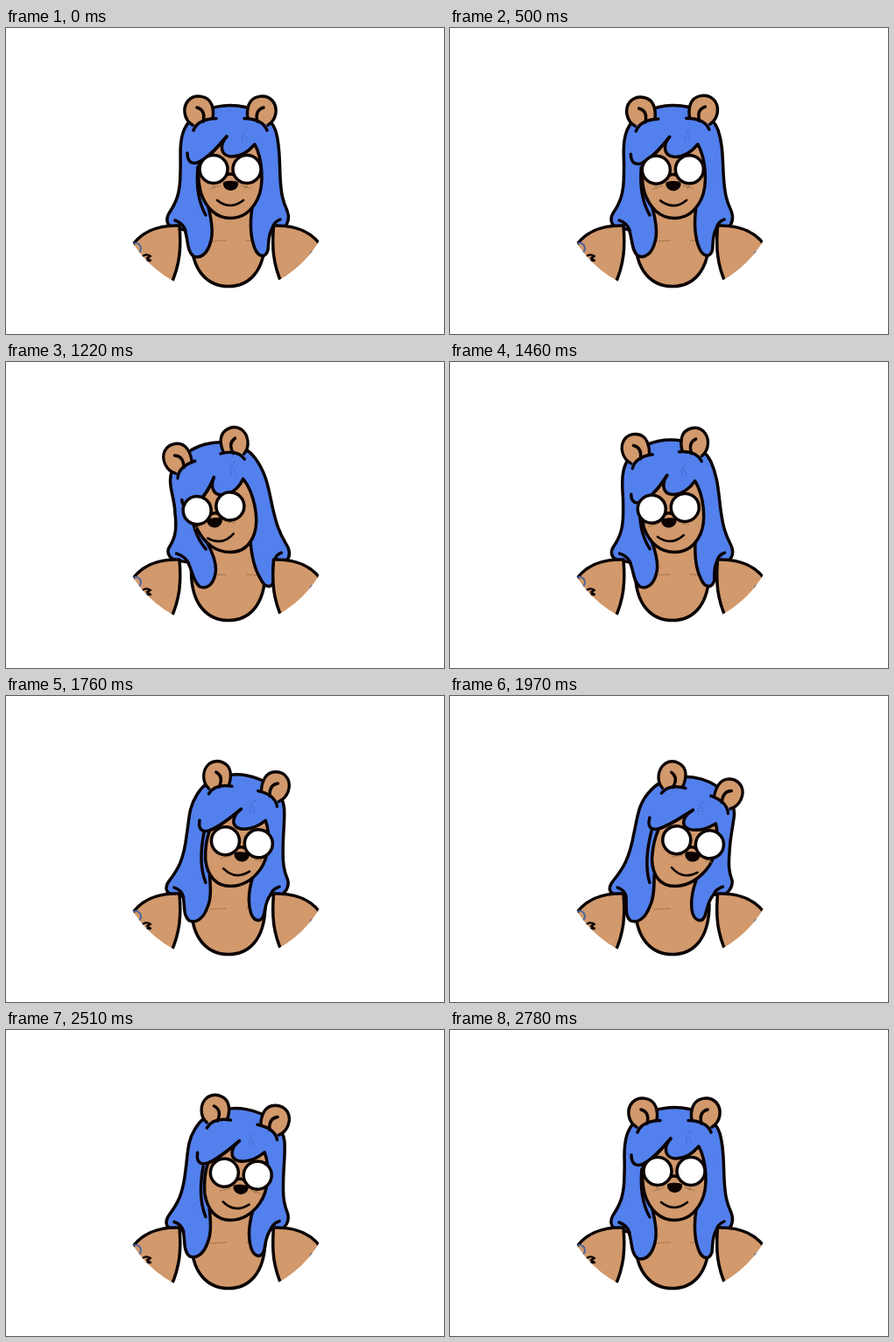
Recreate the animation shown at these times as an HTML page. Size 500 px wide and 350 px high, loop 8000 ms.

```html
<!DOCTYPE html>
<html lang="en">
<head>
<meta charset="utf-8">
<title>Head tilt</title>
<style>
html, body { margin: 0; width: 100%; height: 100%; overflow: hidden; background: #fff; }
svg { display: block; width: 100vw; height: 100vh; }
.ink { fill: none; stroke: #0b0202; stroke-width: 3.5; stroke-linecap: round; stroke-linejoin: round; }
.skin { fill: #d1996c; }
.hair { fill: #5280ed; }
.lens { fill: #fff; }
.hatch { fill: none; stroke: #94693f; stroke-width: 1.2; stroke-dasharray: 1.6 1; }
.shine { fill: none; stroke: #2f57b8; stroke-width: 1; stroke-dasharray: 1.4 1.8; }
</style>
</head>
<body>
<svg viewBox="0 0 500 350">
  <defs>
    <clipPath id="disc"><circle cx="250.5" cy="180" r="124.5"/></clipPath>
    <g id="shoulder">
      <path class="skin" d="M140 255C152 233 174 225 198 226C200 250 199 270 188 294L130 300Z"/>
      <path class="ink" d="M140 255C152 233 174 225 198 226C200 250 199 270 188 294"/>
    </g>
    <g id="ear">
      <path class="ink skin" d="M213 111C203 105 201 91 208 83C216 75 231 77 235 88C237 94 237 98 236 103"/>
      <path class="ink" d="M218 91C225 93 227 99 225 107"/>
      <path class="ink" d="M214 117Q219 104 240 103.5"/>
    </g>
  </defs>

  <path class="ink skin" d="M211.5 238C211 280 232 295.5 254 295.5C276 295.5 296 280 296 238"/>
  <path class="skin" d="M226 200H288V242H226Z"/>
  <path class="hatch" d="M233 244L252 243M274 243L290 244"/>

  <path class="ink hair" data-warp="M190 228C184 226 182 219 186 212C194 200 199 190 199 165C200 145 197 135 202 120C210 95 240 88.5 256 88.5C280 88.5 302 100 308 118C313 135 312 150 313 170C314 190 316 198 321 209C324 217 322 224 317 229L304 229C299 237 300 246 299 254C296 264 288 262 284 252C280 242 278 225 281 205L231 205C234 217 237 232 234 243C230 260 221 264 214 261C206 255 208 240 204 231L190 228Z"/>
  <path class="ink" data-warp="M193 220C199 222 203 226 205 232M304 229C305 224 308 221 313 219"/>
  <path class="ink" data-warp="M219 159C217 180 219 198 228 214"/>
  <path id="shine" class="shine" d="M275 116C270 119 269 124 270 131M273 123L275 130"/>

  <path class="ink skin" data-face="M221 153C235 146 244 133 252 124C244 133 244 145 256 147C268 148 278 140 284 133C293 150 295 180 287 196C279 212 268 217.5 256 217.5C240 217.5 228 206 222 187C219 173 219 162 221 153Z"/>
  <path class="ink" data-face="M207 143C207 158 218 156 226 150C238 141 246 131 252 124"/>

  <g id="ears">
    <use href="#ear"/>
    <use href="#ear" transform="translate(512 0) scale(-1 1)"/>
  </g>

  <g id="nose">
    <path class="hatch" d="M233 184L245 180M236 180L240 183M268 180L280 184M272 183L276 180"/>
    <path d="M248 177C249 174 264 174 265 177C266 182 261 186 256.5 186C252 186 247 182 248 177Z" fill="#0b0202"/>
  </g>
  <path id="mouth" class="ink" style="stroke-width:2.6" d="M241 197Q256 209 271 197"/>
  <g id="specs">
    <path class="ink" d="M252 168Q256 166 260 168"/>
    <circle class="ink lens" cx="237" cy="161.5" r="16"/>
    <circle class="ink lens" cx="275" cy="161.5" r="16"/>
  </g>

  <g clip-path="url(#disc)">
    <use href="#shoulder"/>
    <use href="#shoulder" transform="translate(503.5 0) scale(-1 1)"/>
    <circle cx="148" cy="252" r="6" fill="none" stroke="#4d659c" stroke-width="2"/>
    <path class="ink" style="stroke-width:2.3" d="M154 263Q159 257 165 261L161 263L165 266Q158 267 156 263"/>
    <circle cx="350" cy="258" r="3" fill="#4d659c"/>
  </g>
</svg>
<script>
const LOOP = 8000, START = 500, END = 2780, STEP = 30;
const LEFT = 1082, RIGHT = 2050;
const TILT = 17.7, SQUEEZE = 0.055, PX = 256, PY = 195;
const $ = id => document.getElementById(id);
const clamp = v => Math.max(0, Math.min(1, v));
const hairParts = [...document.querySelectorAll('[data-warp]')];
const faceParts = [...document.querySelectorAll('[data-face]')];

// side: -1 left .. 1 right; lean: 0 at rest, 1 while tilted
function poseAt(t) {
  if (t < START || t >= END) return { side: 0, lean: 0 };
  const s = START + Math.floor((t - START) / STEP) * STEP;
  if (s < LEFT) {
    const a = Math.sin(Math.PI / 2 * (s - START + STEP) / (LEFT - START + STEP));
    return { side: -a, lean: a };
  }
  if (s < RIGHT) return { side: -Math.cos(Math.PI * (s - LEFT) / (RIGHT - LEFT)), lean: 1 };
  const a = Math.cos(Math.PI / 2 * (s - RIGHT) / (END - RIGHT));
  return { side: a, lean: a };
}

// Turns the top fully, slides the cheeks, keeps the chin still and swings the loose ends back
function warp(x, y, { side, lean }, face) {
  const w = clamp((218 - y) / 108);
  const a = side * w * TILT * Math.PI / 180;
  const dx = (x - PX) * (1 - SQUEEZE * lean * w), dy = y - PY;
  let nx = PX + dx * Math.cos(a) - dy * Math.sin(a);
  let ny = PY + dx * Math.sin(a) + dy * Math.cos(a);
  nx += 5 * side * Math.sin(Math.PI * clamp((218 - y) / 80));
  if (face) {
    const k = clamp((218 - y) / 80);
    nx += (2 * lean + 5 * Math.max(0, side)) * k;
    ny += 5 * lean * k;
  } else {
    const k = clamp((y - 210) / 45);
    nx -= 8 * side * k;
    ny += 2 * side * side * w - 4 * lean * k;
  }
  return nx.toFixed(2) + ' ' + ny.toFixed(2);
}

const bend = (d, pose, face) =>
  d.replace(/([\d.]+) ([\d.]+)/g, (_, x, y) => warp(+x, +y, pose, face));

function place(id, dx, dy, angle, cx, cy, sx = 1) {
  $(id).setAttribute('transform',
    `translate(${dx + cx} ${dy + cy}) rotate(${angle}) scale(${sx} 1) translate(${-cx} ${-cy})`);
}

function draw(t) {
  const pose = poseAt(t), { side, lean } = pose;
  for (const el of hairParts) el.setAttribute('d', bend(el.dataset.warp, pose, false));
  for (const el of faceParts) el.setAttribute('d', bend(el.dataset.face, pose, true));
  place('ears', 0.5 * side, 2.5 * side * side, TILT * side, PX, PY, 1 - SQUEEZE * lean);
  place('shine', 15 * side, 3 * side + 1.5 * lean, 8 * side, 272, 123);
  place('specs', 21.8 * side + 0.6 * lean, 5.8 * lean, 8 * side, 256, 161);
  place('nose', 20.5 * side + 0.4 * lean, 3.5 * lean, 8 * side, 256, 180);
  place('mouth', 12 * side, 2 * lean, 11 * side, 256, 198);
}

const t0 = performance.now();
function tick() {
  draw((performance.now() - t0) % LOOP);
  requestAnimationFrame(tick);
}
draw(0);
requestAnimationFrame(tick);
</script>
</body>
</html>
```
